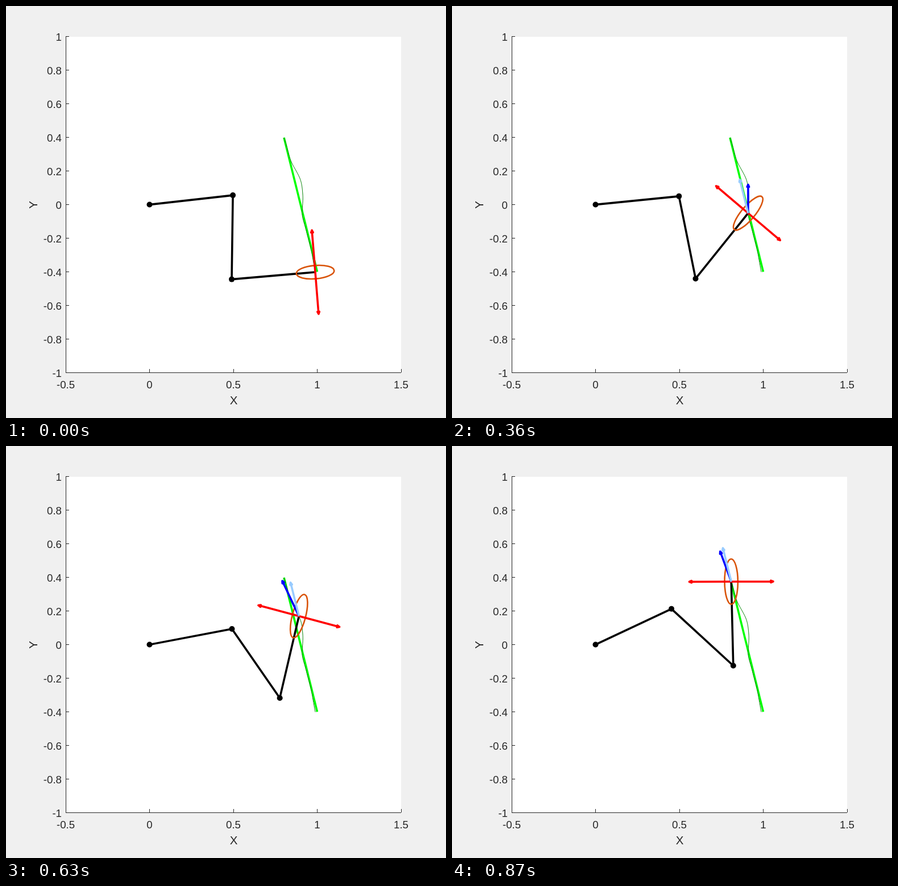
An HTML page that plays this animation: 774x723 px, repeating every 0.9 s.

```html
<!DOCTYPE html>
<html lang="en">
<head>
<meta charset="utf-8">
<title>Planar arm with ellipse</title>
<style>
html, body { margin: 0; width: 100%; height: 100%; overflow: hidden; background: #f0f0f0; }
svg { display: block; }
text { font-family: "Liberation Sans", Arial, sans-serif; font-size: 18.67px; fill: #262626; }
.name { font-size: 20.5px; text-anchor: middle; }
.stroke { fill: none; stroke-width: 3.6; stroke-linejoin: round; }
</style>
</head>
<body>
<svg width="774" height="723" viewBox="0 0 774 723">
  <rect x="105" y="54" width="590" height="589" fill="#fff"/>
  <path id="axes" fill="none" stroke="#262626" shape-rendering="crispEdges"/>
  <g id="labels"></g>
  <text class="name" x="400.5" y="699">X</text>
  <text class="name" transform="translate(54.5 349) rotate(-90)">Y</text>
  <path class="stroke" d="M489 231L547.5 466.5" stroke="#0f0"/>
  <path id="trail" fill="none" stroke="#008000"/>
  <path id="arm" class="stroke"  stroke="#000"/>
  <circle r="5" cx="252.5" cy="348.5"/>
  <circle id="elbow" r="5"/>
  <circle id="wrist" r="5"/>
  <ellipse id="ring" fill="none" stroke="#d95309" stroke-width="2.6" ry="11.7"/>
  <path id="axis" class="stroke" stroke="#f00"/>
  <path id="speed" class="stroke" stroke="#00f"/>
  <path id="goal" class="stroke" stroke="#99ccff"/>
</svg>
<script>
const $ = id => document.getElementById(id);
const STEP = 30, STEPS = 30, LINK = 147.5, GAIN = 7.8, RAD = Math.PI / 180;
const base = [252.5, 348.5];

// tip of the arm: step, x, y, arrow dx, arrow dy
const tipKeys = [
  [0, 544, 467, 0, 0],
  [4, 538.5, 436, -13.5, -81],
  [8, 528.5, 395.5, -17, -70.5],
  [12, 520.9, 363.5, 0, -50],
  [17, 522, 330, -4.7, -58],
  [20.5, 517, 302.5, -24, -61],
  [24, 502.6, 275, -27, -58],
  [29, 491.2, 238, -19.5, -53]
];
const poseSteps = [0, 4, 8, 12, 17, 24, 29];
const handAngle = track([4.9, 18.4, 36.6, 51.2, 63.7, 85.4, 91.4]);
const ringAngle = track([4.6, 17.2, 35.1, 49.8, 62, 83.8, 90.2]);
const ringSize = track([33.4, 34.6, 36.2, 37.7, 38.5, 39.6, 39.8]);

// cubic Hermite: value and rate
function hermite(s, s0, p0, v0, s1, p1, v1) {
  const h = s1 - s0, u = (s - s0) / h, d = p1 - p0, a = v0 * h, b = v1 * h;
  const c3 = a + b - 2 * d, c2 = 3 * d - 2 * a - b;
  return [p0 + u * (a + u * (c2 + u * c3)), (a + u * (2 * c2 + 3 * u * c3)) / h];
}

function segment(steps, s) {
  let i = 0;
  while (i < steps.length - 2 && s >= steps[i + 1]) i++;
  return i;
}

function track(vals) {
  const last = vals.length - 1;
  const slope = i => (vals[i + 1] - vals[i]) / (poseSteps[i + 1] - poseSteps[i]);
  const rates = vals.map((v, i) =>
    i === 0 ? 0 : i === last ? slope(i - 1) : (slope(i - 1) + slope(i)) / 2);
  return s => {
    const i = segment(poseSteps, s);
    return hermite(s, poseSteps[i], vals[i], rates[i],
      poseSteps[i + 1], vals[i + 1], rates[i + 1])[0];
  };
}

function tipAt(s) {
  const i = segment(tipKeys.map(k => k[0]), s);
  const a = tipKeys[i], b = tipKeys[i + 1];
  const [x, vx] = hermite(s, a[0], a[1], a[3] / GAIN, b[0], b[1], b[3] / GAIN);
  const [y, vy] = hermite(s, a[0], a[2], a[4] / GAIN, b[0], b[2], b[4] / GAIN);
  return { p: [x, y], v: [vx * GAIN, vy * GAIN] };
}

const polar = ([x, y], r, angle) => [x + r * Math.cos(angle), y + r * Math.sin(angle)];
const fmt = p => p.map(n => n.toFixed(2)).join(" ");
const line = pts => "M" + pts.map(fmt).join("L");

function arrow(from, [dx, dy]) {
  const tip = [from[0] + dx, from[1] + dy], angle = Math.atan2(dy, dx);
  const barb = side => polar(tip, 4.4, angle + Math.PI + side * 0.4);
  return line([from, tip]) + line([barb(1), tip, barb(-1)]) + "Z";
}

function place(id, [x, y]) {
  $(id).setAttribute("cx", x);
  $(id).setAttribute("cy", y);
}

function label(text, x, y, anchor) {
  const el = document.createElementNS("http://www.w3.org/2000/svg", "text");
  el.textContent = text;
  el.setAttribute("x", x);
  el.setAttribute("y", y);
  el.setAttribute("text-anchor", anchor);
  $("labels").append(el);
}

function buildPlot() {
  let d = "M105.5 54V644M105 643.5H695";
  for (let i = 0; i <= 10; i++) {
    const y = 53.5 + 59 * i;
    d += `M105 ${y}H111`;
    label(String((10 - 2 * i) / 10), 98, y + 7.5, "end");
  }
  for (let i = 0; i <= 4; i++) {
    const x = 105 + 147.5 * i;
    d += `M${Math.floor(x) + 0.5} 643V637`;
    label(String(i / 2 - 0.5), x, 671, "middle");
  }
  $("axes").setAttribute("d", d);
  const pts = [];
  for (let s = 0; s < STEPS - 1; s += 0.25) pts.push(tipAt(s).p);
  pts.push(tipAt(STEPS - 1).p, [489, 231]);
  $("trail").setAttribute("d", line(pts));
}

function draw(s) {
  const { p, v } = tipAt(s);
  const wrist = polar(p, -LINK, -handAngle(s) * RAD);
  const dx = wrist[0] - base[0], dy = wrist[1] - base[1];
  const lift = Math.acos(Math.min(1, Math.hypot(dx, dy) / (2 * LINK)));
  const elbow = polar(base, LINK, Math.atan2(dy, dx) - lift);
  $("arm").setAttribute("d", line([base, elbow, wrist, p]));
  place("elbow", elbow);
  place("wrist", wrist);

  const tilt = ringAngle(s);
  place("ring", p);
  $("ring").setAttribute("rx", ringSize(s));
  $("ring").setAttribute("transform", `rotate(${-tilt} ${fmt(p)})`);
  const n = polar([0, 0], 73.75, -(tilt + 90) * RAD);
  $("axis").setAttribute("d", arrow(p, n) + arrow(p, n.map(c => -c)));

  $("speed").setAttribute("d", s ? arrow(p, v) : "");
  $("goal").setAttribute("d", s ? arrow(p, [-14.75, -59]) : "");
}

buildPlot();
draw(0);
const start = performance.now();
function tick() {
  const t = Math.max(0, performance.now() - start);
  draw(Math.floor(t / STEP) % STEPS);
  requestAnimationFrame(tick);
}
requestAnimationFrame(tick);
</script>
</body>
</html>
```
